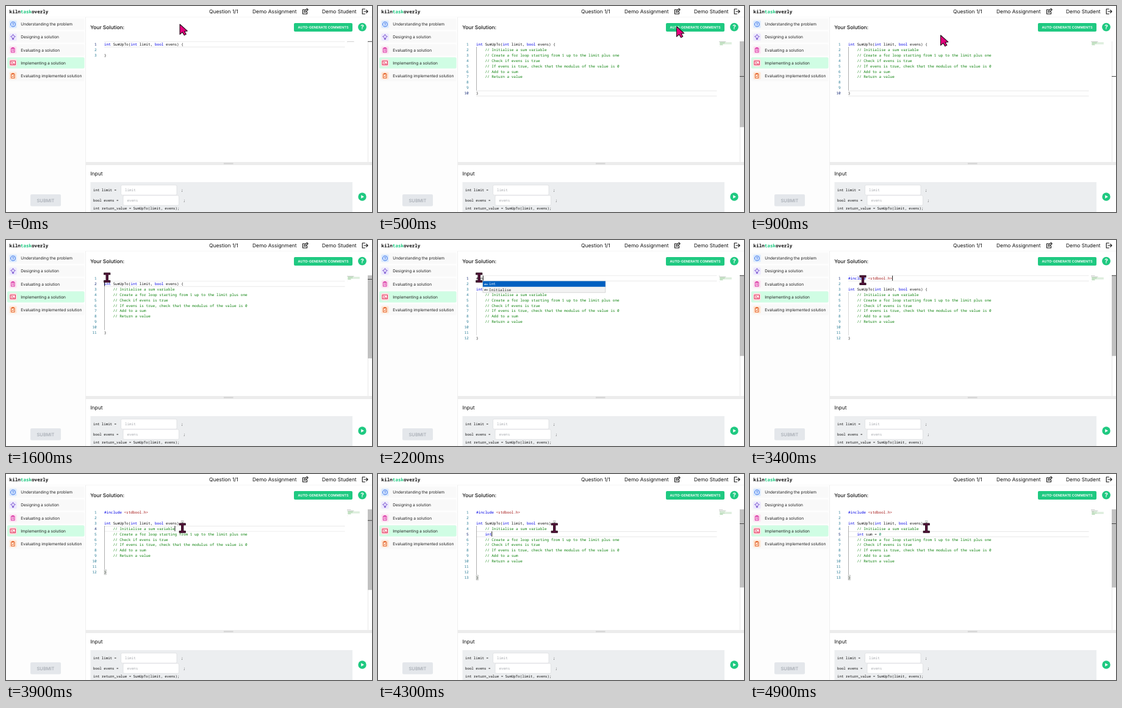
These frames come from a looping animation (600x338 px, 5 s). An HTML page with a canvas:

```html
<!DOCTYPE html>
<html lang="en">
<head>
<meta charset="utf-8">
<title>Code editor demo</title>
<style>
html, body { margin: 0; width: 100%; height: 100%; overflow: hidden; background: #fff; }
canvas { display: block; width: 600px; height: 338px; }
</style>
</head>
<body>
<canvas id="stage"></canvas>
<script>
const canvas = document.getElementById('stage');
const dpr = window.devicePixelRatio || 1;
canvas.width = 600 * dpr;
canvas.height = 338 * dpr;
const ctx = canvas.getContext('2d');
ctx.textRendering = 'geometricPrecision';

const UI = 'Inter, sans-serif';
const MONO = '"Noto Sans Mono", "DejaVu Sans Mono", monospace';
const GREEN = '#1fc981';
const LOOP = 5000, STEP = 100;
const CODE_X = 161, CODE_Y = 62.6, ROW = 8.95, CODE_SIZE = 6.02;
const VIEW_TOP = 58, VIEW_H = 198;

const SIGNATURE = 'int SumUpTo(int limit, bool evens) {';
const COMMENTS = [
  'Initialise a sum variable',
  'Create a for loop starting from 1 up to the limit plus one',
  'Check if evens is true',
  'If evens is true, check that the modulus of the value is 0',
  'Add to a sum',
  'Return a value'
].map(s => '    // ' + s);
const INCLUDE = '#include <stdbool.h>';
const STATEMENT = 'int sum = 0';

function rect(x, y, w, h, fill, r = 0, stroke) {
  ctx.beginPath();
  ctx.roundRect(x, y, w, h, r);
  if (fill) { ctx.fillStyle = fill; ctx.fill(); }
  if (stroke) { ctx.strokeStyle = stroke; ctx.lineWidth = 0.7; ctx.stroke(); }
}

function circle(x, y, r, fill) {
  ctx.beginPath();
  ctx.arc(x, y, r, 0, Math.PI * 2);
  ctx.fillStyle = fill;
  ctx.fill();
}

// y is the middle of the capitals
function text(s, x, y, size, color, { family = UI, weight = 400, align = 'left' } = {}) {
  ctx.font = `${weight} ${size}px ${family}`;
  ctx.textAlign = align;
  ctx.fillStyle = color;
  ctx.fillText(s, x, y + size * 0.36);
  return ctx.measureText(s).width;
}

const mono = (s, x, y, color, size = CODE_SIZE, weight = 400) =>
  text(s, x, y, size, color, { family: MONO, weight });

function stroke(path, x, y, color, width = 1) {
  ctx.save();
  ctx.translate(x, y);
  ctx.strokeStyle = color;
  ctx.lineWidth = width;
  ctx.lineCap = ctx.lineJoin = 'round';
  ctx.stroke(new Path2D(path));
  ctx.restore();
}

const CLIPBOARD = 'M-2.6-3H2.6V3.8H-2.6ZM-1-3.8H1V-2.4H-1Z';
const STEPS = [
  ['Understanding the problem', '#dbeafe', '#3b74e8', 'M-4 0A4 4 0 1 1 4 0A4 4 0 1 1-4 0M-1.2-1A1.2 1.2 0 1 1 0 .5V.8M0 2.2V2.3'],
  ['Designing a solution', '#ede9fe', '#6a3fc8', 'M-1.2 2V1A2.3 2.3 0 1 1 1.2 1V2ZM-1 3.6H1M0-4.4V-4M-4-1H-3.6M3.6-1H4'],
  ['Evaluating a solution', '#fce3f2', '#d6219c', CLIPBOARD + 'M-1-.5H1M-1 1.5H1'],
  ['Implementing a solution', '#fddfe3', '#e02350', 'M-4-3.2H4V3.2H-4ZM-2.2-1.4L-.7 0L-2.2 1.4M.4 1.5H2.2'],
  ['Evaluating implemented solution', '#ffe8d6', '#e2571c', CLIPBOARD + 'M-1.2 .8L-.3 1.7L1.3-.3']
];

function drawHeader() {
  let x = 5.6;
  const brand = { family: MONO, weight: 700 };
  for (const [part, color] of [['kiln', '#111'], ['task', GREEN], ['overly', '#111']])
    x += text(part, x, 9.2, 7.6, color, brand);
  text('Question 1/1', 333, 9, 8.42, '#111');
  text('Demo Assignment', 404, 9, 8.42, '#111');
  text('Demo Student', 518, 9, 8.42, '#111');
  stroke('M-.5-3H-4V4H3V.8M-1.5 1.3L-1.2-.8L3-4.6L4.6-3L.5 1Z', 490.5, 9, '#111', 1.1);
  stroke('M0-4H-4.3V4H0M-1.5 0H4.5M2.3-2.3L4.6 0L2.3 2.3', 588.5, 9, '#111', 1.1);
}

function drawSidebar() {
  rect(0, 18, 130.5, 320, '#fdfdfd');
  rect(130, 18, 1, 320, '#f0f0f0');
  STEPS.forEach(([label, tile, color, icon], i) => {
    const y = 30 + i * 21.1;
    rect(2, y - 9, 126.5, 18.2, i === 3 ? '#d0fde4' : '#f9f9f9', 2);
    rect(5.3, y - 6.2, 12.4, 12.4, tile, 2);
    stroke(icon, 11.5, y, color, 0.95);
    text(label, 24.3, y, 6.56, '#222');
  });
  rect(40, 309, 50, 19.5, '#e4e7eb', 2);
  text('SUBMIT', 65, 319, 7.45, '#a3a8b0', { weight: 500, align: 'center' });
}

function drawToolbar() {
  text('Your Solution:', 138.2, 34.6, 8.4, '#111', { weight: 500 });
  rect(472, 28, 96, 14, GREEN, 2);
  text('AUTO-GENERATE COMMENTS', 520, 34.8, 5.6, '#fff', { weight: 600, align: 'center' });
  circle(584, 34.6, 6.9, GREEN);
  text('?', 584, 34.8, 10, '#fff', { weight: 700, align: 'center' });
}

function drawInputs() {
  rect(131, 256, 469, 5, '#ececec');
  rect(357, 257.5, 15.5, 2, '#d2d2d2');
  text('Input', 138.3, 274.5, 8.42, '#111');
  rect(138.5, 289, 429.5, 49, '#eceef0');
  const field = (label, name, x, y) => {
    mono(label, 143, y, '#111', 5.75, 500);
    rect(x, y - 8.2, 91.5, 16.4, '#fff', 2, '#d8dadd');
    mono(name, x + 6.5, y, '#a5a8ad', 5.9);
    mono(';', x + 98.5, y, '#111', 5.75, 500);
  };
  field('int limit =', 'limit', 188.5, 302);
  field('bool evens =', 'evens', 192, 319);
  mono('int return_value = SumUpTo(limit, evens);', 143, 331.8, '#111', 5.75, 500);
  circle(584, 313, 6.7, GREEN);
  ctx.fillStyle = '#fff';
  ctx.fill(new Path2D('M582.2 310.2L587 313L582.2 315.8Z'));
}

const typedInclude = t => INCLUDE.slice(0, Math.max(0, Math.floor(3 + (t - 2200) * 11 / 600 + 1e-6)));

function typedStatement(t) {
  const n = (t - 4000) / STEP;
  return STATEMENT.slice(0, n < 8 ? n : n < 9 ? 9 : 11);
}

function editorState(t) {
  const lines = [SIGNATURE];
  if (t < 500) return { lines: [...lines, '', '}'], active: 1 };
  lines.push(...COMMENTS, '', '', '}');
  if (t < 1300) return { lines, active: 10, guide: true };
  if (t < 1500) return { lines, active: 1, caret: 0, guide: true };
  if (t < 1800) return { lines: ['', ...lines], active: 2, caret: 0, guide: true };
  const first = typedInclude(t);
  lines.unshift(first, '');
  if (t < 1900) return { lines, active: 3, caret: 0, guide: true };
  if (t < 3700) {
    const popup = first === '#in' && ['int', 'Initialise'];
    return { lines, active: 1, caret: first.length, popup };
  }
  const state = { lines, active: 4, caret: lines[3].length, guide: true, brackets: true };
  if (t < 4000) return state;
  const typed = typedStatement(t);
  lines.splice(4, 0, '    ' + typed);
  state.active = 5;
  state.caret = t < 4900 ? 4 + typed.length : undefined;
  if (typed === 'in') state.popup = ['int', 'Initialise'];
  if (/ su?m?$/.test(typed) && typed.length > 4) state.popup = ['sum', 'SumUpTo'];
  return state;
}

const TOKENS = /\/\/.*|#include|<[^>]*>|\b(?:int|bool)\b|\d+|[^\s]+?(?=\b|\s|$)|\s+/g;

function tokenColor(token) {
  if (token.startsWith('//')) return '#0a800a';
  if (/^(int|bool|#include)$/.test(token)) return '#0000e6';
  if (/^<.+>$/.test(token)) return '#a31515';
  if (/^\d+$/.test(token)) return '#098658';
  return '#111';
}

function drawEditor(t) {
  const { lines, active, caret, guide, brackets, popup } = editorState(t);
  const count = lines.length;
  const rowY = n => CODE_Y + (n - 1) * ROW;
  ctx.font = `400 ${CODE_SIZE}px ${MONO}`;
  const advance = ctx.measureText('0').width;
  const colX = col => CODE_X + col * advance;
  const openInclude = /^#include <[^>]*$/.test(lines[0]);

  for (const edge of [-4.4, 4.2]) rect(CODE_X, rowY(active) + edge, 394.5, 0.9, '#e8e8e8');

  const open = lines.indexOf(SIGNATURE) + 1;
  if (count > 3)
    rect(CODE_X, rowY(open) + 4.5, 0.8, (count - open - 1) * ROW, guide ? '#9a9a9a' : '#d0d0d0');
  if (brackets)
    for (const [col, row] of [[35, open], [0, count]])
      rect(colX(col), rowY(row) - 4, advance, 8, '#e9eee9', 0, '#b9b9b9');

  lines.forEach((line, i) => {
    const y = rowY(i + 1);
    text(String(i + 1), 148.7, y, CODE_SIZE, i + 1 === active ? '#0b216f' : '#237893',
      { family: MONO, align: 'right' });
    for (const m of line.matchAll(TOKENS)) {
      const plain = openInclude && line === SIGNATURE;
      mono(m[0], colX(m.index), y, plain ? '#111' : tokenColor(m[0]));
    }
    const body = line.trimStart();
    ctx.globalAlpha = 0.38;
    rect(559 + (line.length - body.length) * 0.32, VIEW_TOP + i * 0.94, body.length * 0.32, 0.6,
      body.startsWith('//') && !openInclude ? '#008000' : '#333');
    ctx.globalAlpha = 1;
  });

  if (caret !== undefined) rect(colX(caret), rowY(active) - 4.2, 0.9, 8.4, '#000');
  drawScrollbar(t, count, active);
  if (popup) drawPopup(popup, colX(caret), rowY(active) + 4.8);
}

function drawScrollbar(t, count, active) {
  const scale = VIEW_H / (VIEW_H + (count - 1) * ROW);
  rect(593, VIEW_TOP, 0.8, VIEW_H, '#e2e2e2');
  if ((t >= 500 && t < 800) || t >= 1100)
    rect(593, VIEW_TOP, 7, VIEW_H * scale, '#c1c1c1');
  rect(593, VIEW_TOP + (active - 1) * ROW * scale - 0.2, 7, 1, '#424242');
}

function drawPopup(items, x, y) {
  rect(x, y, 201, 18.8, '#f3f3f3', 0, '#c8c8c8');
  rect(x, y, 201, 9.4, '#0060c0');
  items.forEach((item, i) => {
    const cy = y + 4.8 + i * 9.2;
    const color = i ? '#222' : '#fff';
    text('abc', x + 1.8, cy, 4, color, { weight: 500 });
    mono(item, x + 10.2, cy, color);
  });
}

const POINTER = [
  [0, 285, 30], [300, 488, 33], [600, 490, 34], [900, 312.5, 48],
  [1200, 165.7, 61.7], [3300, 165.7, 61.7], [3700, 289.2, 88.6], [LOOP, 289.2, 88.6]
];

function pointerAt(t) {
  const i = POINTER.findIndex(p => p[0] > t);
  const [t0, x0, y0] = POINTER[i - 1];
  const [t1, x1, y1] = POINTER[i];
  const u = (t - t0) / (t1 - t0);
  const k = u * u * (3 - 2 * u);
  return [x0 + (x1 - x0) * k, y0 + (y1 - y0) * k];
}

const ARROW = new Path2D('M0 0V16.5L4.2 12.9L7.2 18L10.3 16.3L7.5 11.6L12.3 11Z');
const BEAM = new Path2D('M-5-7.6H5V-4.9H1.6V4.9H5V7.6H-5V4.9H-1.6V-4.9H-5Z');

function drawPointer(t) {
  const beam = t >= 1100;
  const shape = beam ? BEAM : ARROW;
  ctx.save();
  ctx.translate(...pointerAt(t));
  ctx.lineJoin = 'round';
  ctx.lineWidth = 1.1;
  ctx.fillStyle = beam ? '#56103a' : '#e5007d';
  ctx.strokeStyle = beam ? '#2a0a1d' : '#2b1020';
  ctx.fill(shape);
  ctx.stroke(shape);
  ctx.restore();
}

function draw(t) {
  ctx.setTransform(dpr, 0, 0, dpr, 0, 0);
  rect(0, 0, 600, 338, '#fff');
  rect(0, 17.8, 600, 0.7, '#f1f1f1');
  drawHeader();
  drawSidebar();
  drawToolbar();
  drawEditor(t);
  drawInputs();
  drawPointer(t);
}

const start = performance.now();
function tick() {
  const elapsed = Math.max(0, performance.now() - start) % LOOP;
  draw(Math.floor(elapsed / STEP) * STEP);
  requestAnimationFrame(tick);
}
tick();
</script>
</body>
</html>
```
